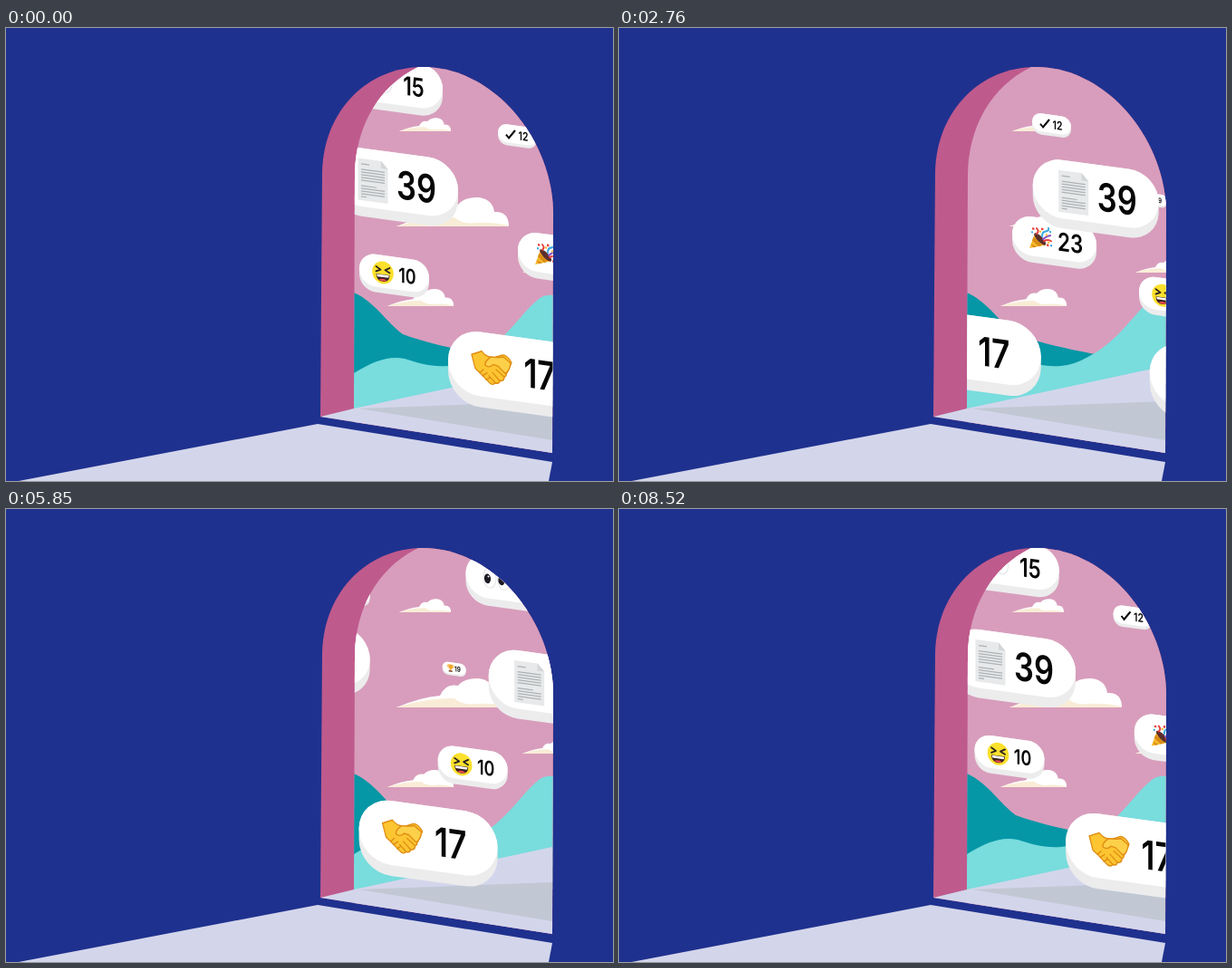
Write an HTML page that moves like this. It is 670x500 px and loops after 8.55 s.

```html
<!DOCTYPE html>
<html lang="en">
<head>
<meta charset="utf-8">
<title>Reactions through the archway</title>
<style>
  html, body { margin: 0; width: 100%; height: 100%; overflow: hidden; background: #1f318e; }
  svg { display: block; width: 670px; height: 500px; }
  text { font-family: Inter, "Liberation Sans", sans-serif; font-weight: 600; text-anchor: middle; fill: #060606; }
</style>
</head>
<body>
<svg viewBox="0 0 670 500">
  <defs>
    <clipPath id="opening">
      <path id="inner" d="M384 420L385 160C386 110 410 65 455 43L460 43C540 43 604 125 604 205L603 469L384 435Z"/>
    </clipPath>
    <g id="cloud">
      <path fill="#fff" d="M0 0Q26 -11 48 -13Q54 -27 68 -24Q76 -33 91 -32Q106 -30 108 -16Q124 -17 124 0Z"/>
      <path fill="#f9ecd6" d="M0 0Q34 -11 64 -10Q72 -2 88 -4Q106 -5 124 -1V0Z"/>
    </g>

    <g id="shake" stroke="#e08e14" stroke-width="1.4" stroke-linejoin="round" stroke-linecap="round" fill="#fcc531">
      <path d="M3 -12L12 -16Q17 -17 22 -9L17 3L9 8L-8 -2Z"/>
      <path d="M-22 -12L-11 -17Q-7 -12 -2 -12L5 -12Q9 -11 15 1Q18 6 14 8Q14 13 9 13Q8 17 4 16Q1 20 -3 16L-13 7L-18 3Z"/>
      <path fill="#fdd04a" d="M-1 -12Q-8 -6 -7 -2Q-3 1 2 -4L7 -3L15 4Q20 1 21 -8L13 -14Q6 -12 -1 -12Z"/>
      <path fill="none" d="M14 8L5 1M9 13L1 5M4 16L-3 9M-13 7L-9 3M-10 10L-5 6M-6 14L-2 11"/>
    </g>

    <g id="page">
      <path fill="#e7e9ea" d="M-16.5 -23H9L16.5 -15V23H-16.5Z"/>
      <path fill="#d3d6d8" d="M9 -23L16.5 -15H9Z"/>
      <path stroke="#adb1b4" stroke-width="1.2" d="M-13 -17H-4M-13 -11H13M-13 -8H13M-13 -5H13M-13 -2H13M-13 1H13M-13 7H4M-13 10H13M-13 13H13M-13 16H13M-13 19H-7"/>
    </g>

    <g id="eyes">
      <g id="eye">
        <ellipse cx="-7.5" rx="7" ry="11" fill="#fff" stroke="#e2e4e8"/>
        <ellipse cx="-10" cy="1" rx="3.6" ry="5.3" fill="#1d1a24"/>
        <circle cx="-9" cy="-1.5" r="1" fill="#fff"/>
      </g>
      <use href="#eye" x="15.5"/>
    </g>

    <g id="party">
      <path fill="#f6b92c" d="M-12 12L-6 -5Q3 -1 6 6Z"/>
      <path fill="#d98c14" d="M-10.5 7L-4 9.5L-8 10.8ZM-7.5 -1L2 7L-2 8.7L-9 3Z"/>
      <ellipse fill="#5b2f2c" cx="0" cy="0.5" rx="8.3" ry="3.2" transform="rotate(42)"/>
      <g fill="none" stroke-width="2" stroke-linecap="round">
        <path stroke="#e8413c" d="M-4 -5Q-1 -8 -4 -11M4 2Q8 -1 12 1"/>
        <path stroke="#3fa9e0" d="M2 -3Q2 -8 6 -9T9 -13"/>
        <path stroke="#8a55c8" d="M3 0Q7 -4 11 -5"/>
      </g>
      <path stroke="#e8413c" stroke-width="2.4" d="M-9 -10h2.4M1 -11h2.4M7 6h2.4"/>
      <path stroke="#3fa9e0" stroke-width="2.2" d="M-10 -6h2M10 -9h2M11 6h2"/>
      <path stroke="#f6b92c" stroke-width="2.2" d="M-1 -8h2M6 -5h2M8 3h2"/>
    </g>

    <g id="laugh">
      <ellipse rx="11.8" ry="12.4" fill="#fbe02c"/>
      <path fill="none" stroke="#2b2320" stroke-width="1.8" stroke-linecap="round" stroke-linejoin="round" d="M-7.5 -6L-2.5 -3L-7.5 -.5M7.5 -6L2.5 -3L7.5 -.5"/>
      <path fill="#3a2220" d="M-7.5 2H7.5Q7.5 9.8 0 9.8T-7.5 2Z"/>
      <path fill="#fff" d="M-6.8 2.4H6.8L6.2 5H-6.2Z"/>
      <path fill="#ee4b4f" d="M-4.5 8.4Q0 5.4 4.5 8.4Q0 10.6 -4.5 8.4Z"/>
    </g>

    <path id="tick" fill="none" stroke="#060606" stroke-width="2" d="M-5 .8L-2 4.2L5 -5.2"/>

    <g id="cup">
      <path fill="#f3a72d" d="M-2.6 -4H2.6Q2.6 0 .7 1.2V2.6H-.7V1.2Q-2.6 0 -2.6 -4Z"/>
      <path fill="none" stroke="#f3a72d" stroke-width=".7" d="M-2.5 -3H-3.6Q-3.6 -.6 -2 -.4M2.5 -3H3.6Q3.6 -.6 2 -.4"/>
      <path fill="#7a4a35" d="M-2 2.4H2V4H-2Z"/>
    </g>
  </defs>

  <rect width="670" height="500" fill="#1f318e"/>
  <path fill="#d3d6eb" d="M344 437L603 479L599 500H14Z"/>
  <path fill="#bf5a8d" d="M347 429L349 158C351 90 400 43 460 43C540 43 604 125 604 205L603 469Z"/>
  <use href="#inner" fill="#d89dbc"/>

  <g clip-path="url(#opening)">
    <use href="#cloud" transform="translate(434 114) scale(.46)"/>
    <use href="#cloud" transform="translate(431 219)"/>
    <use href="#cloud" transform="translate(421 307) scale(.59)"/>
    <use href="#cloud" transform="translate(570 270) scale(.46)"/>
    <path fill="#0597a6" d="M384 292C408 303 420 325 438 338C465 348 495 354 530 361L520 380L384 390Z"/>
    <path fill="#79dcdd" d="M384 381C405 368 422 361 440 365C462 372 485 379 512 366C552 347 565 318 588 299Q595 294 604 295V420L384 430Z"/>
  </g>
  <path fill="#d3d6eb" d="M347 429L384 420L603 373V469Z"/>
  <path fill="#c1c8d4" d="M390 420L603 412V455Z"/>
  <g id="pills" clip-path="url(#opening)"></g>
</svg>

<script>
const LOOP = 8550, STEP = 30;
const SLOPE = 0.137, MID = 500, EDGE = 384;

// y is the row's height at x = MID; gap is the spacing of repeats; speed in px per ms
const rows = [
  { icon: 'cup',   label: 19, size: 8,    w: 26,  x: 436, y: 177,   gap: 230, speed: 0.0315,     iconX: 9,  textX: 16.7 },
  { icon: 'tick',  label: 12, size: 13,   w: 43,  x: 543, y: 109.7, gap: 271, speed: 271 / 8600, iconX: 14, textX: 28 },
  { icon: 'laugh', label: 10, size: 22.5, w: 77,  x: 390, y: 281.5, gap: 271, speed: 271 / 8600, iconX: 26, textX: 53 },
  { icon: 'eyes',  label: 15, size: 28.5, w: 105, x: 377, y: 71.5,  gap: 408, speed: 408 / 8600, iconX: 34, textX: 73 },
  { icon: 'party', label: 23, size: 28,   w: 93,  x: 565, y: 237.4, gap: 408, speed: 408 / 8600, iconX: 31, textX: 64 },
  { icon: 'page',  label: 39, size: 43,   w: 139, x: 360, y: 181.7, gap: 270, speed: 270 / 4300, iconX: 45, textX: 93 },
  { icon: 'shake', label: 17, size: 44,   w: 153, x: 488, y: 370.3, gap: 273, speed: 273 / 4300, iconX: 48, textX: 101 }
];

const capsule = (w, k, height, fill) =>
  `<rect y="${-38 * k}" width="${w}" height="${height * k}" rx="${35.5 * k}" fill="${fill}"/>`;

function pill({ icon, label, size, w, iconX, textX }) {
  const k = w / 153;
  return capsule(w, k, 83, '#ececed') + capsule(w, k, 71, '#fff') +
    `<use href="#${icon}" x="${iconX}"/>` +
    `<text transform="translate(${textX} ${size * 0.364}) scale(.8 1)" font-size="${size}">${label}</text>`;
}

// Two copies per row are enough to cover the opening
const layer = document.getElementById('pills');
layer.innerHTML = rows.map(r =>
  `<g transform="matrix(1 ${SLOPE} 0 1 0 ${r.y - SLOPE * MID})"><g><g>${pill(r)}</g>` +
  `<g transform="translate(${r.gap})">${pill(r)}</g></g></g>`).join('');
const movers = [...layer.children].map(g => g.firstElementChild);

const mod = (a, n) => ((a % n) + n) % n;

function draw(now) {
  const t = Math.floor((now % LOOP) / STEP) * STEP;
  rows.forEach((r, i) => {
    const start = EDGE - r.w;
    const x = start + mod(r.x - r.speed * t - start, r.gap);
    movers[i].setAttribute('transform', `translate(${x.toFixed(2)})`);
  });
}

function tick() {
  draw(performance.now());
  requestAnimationFrame(tick);
}
tick();
</script>
</body>
</html>
```
